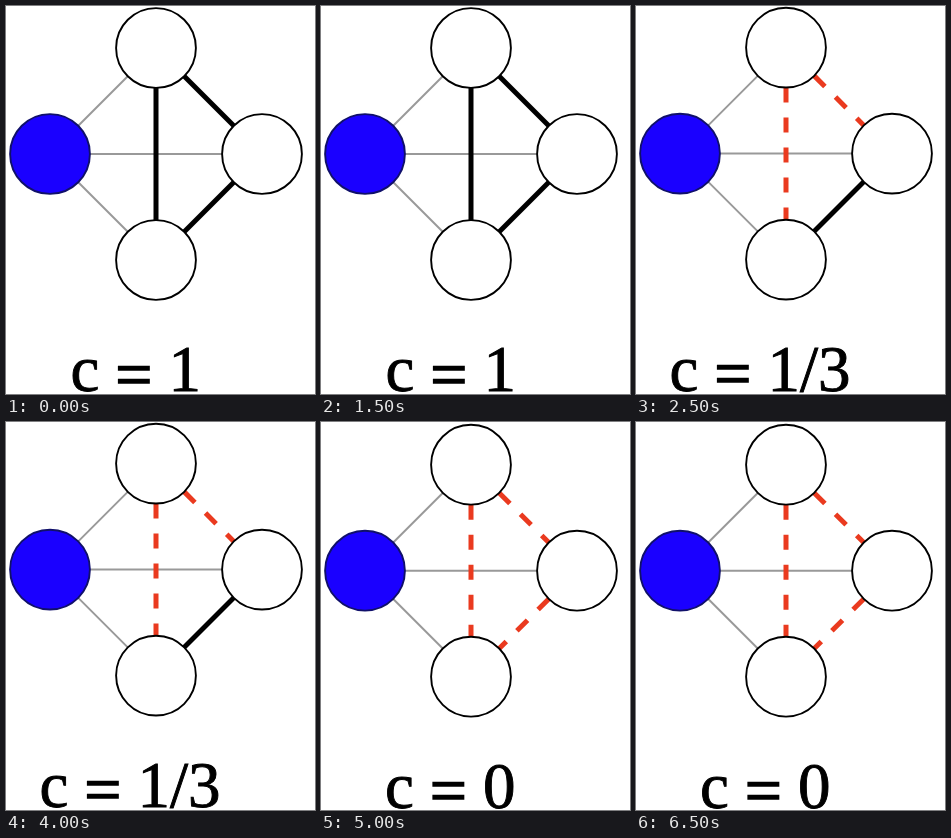
Write an HTML page that moves like this. It is 309 by 388 pixels and loops after 7500 ms.

```html
<!DOCTYPE html>
<html lang="en">
<head>
<meta charset="utf-8">
<title>Clustering coefficient</title>
<style>
  html, body { margin: 0; width: 100%; height: 100%; overflow: hidden; background: #fff; }
  svg { display: block; }
  text { font: 65px "Liberation Serif", Times, serif; white-space: pre; stroke: #000; stroke-width: 0.9; }
  .equals { stroke-width: 1.7; }
  circle { fill: #fff; stroke: #000; stroke-width: 1.9; }
  circle.focus { fill: #1a00ff; stroke: #10106a; }
  line { stroke: #999; stroke-width: 2; }
  .present { stroke: #000; stroke-width: 5; }
  /* The offset starts the first dash at the rim of the circle. */
  .missing { stroke: #ea3a1f; stroke-width: 5; stroke-dasharray: 15; stroke-dashoffset: -10; }
</style>
</head>
<body>
<svg width="309" height="388" viewBox="0 0 309 388"></svg>
<script>
const STEP = 2500;
const svg = document.querySelector('svg');

const upper = [150, 42], left = [44, 148], right = [256, 148], lower = [150, 254];
const spokes = [[left, upper], [left, right], [left, lower]];
const links = [[upper, right], [upper, lower], [right, lower]];

// missing: how many links, in order, are shown as absent
const states = [
  { value: '1', x: 64.5, dy: 0, missing: 0 },
  { value: '1/3', x: 33.5, dy: -0.4, missing: 2 },
  { value: '0', x: 64, dy: 0.7, missing: 3 },
];

const line = ([[x1, y1], [x2, y2]], kind) =>
  `<line class="${kind}" x1="${x1}" y1="${y1}" x2="${x2}" y2="${y2}"/>`;
const node = ([x, y], kind = '') =>
  `<circle class="${kind}" cx="${x}" cy="${y}" r="39.9"/>`;
// The equals sign sits lower and heavier than the font's own.
const label = (value, x) =>
  `<text x="${x}" y="385.3">c <tspan class="equals" dy="5.5">=</tspan><tspan dy="-5.5"> ${value}</tspan></text>`;

function draw({ value, x, dy, missing }) {
  svg.innerHTML = `<g transform="translate(0 ${dy})">` +
    spokes.map(s => line(s, 'spoke')).join('') +
    links.map((l, i) => line(l, i < missing ? 'missing' : 'present')).join('') +
    [upper, right, lower].map(p => node(p)).join('') +
    node(left, 'focus') + label(value, x) + '</g>';
}

let shown = -1;
const start = performance.now();
function tick() {
  const index = Math.floor((performance.now() - start) / STEP) % states.length;
  if (index !== shown) draw(states[shown = index]);
  requestAnimationFrame(tick);
}
tick();
</script>
</body>
</html>
```
